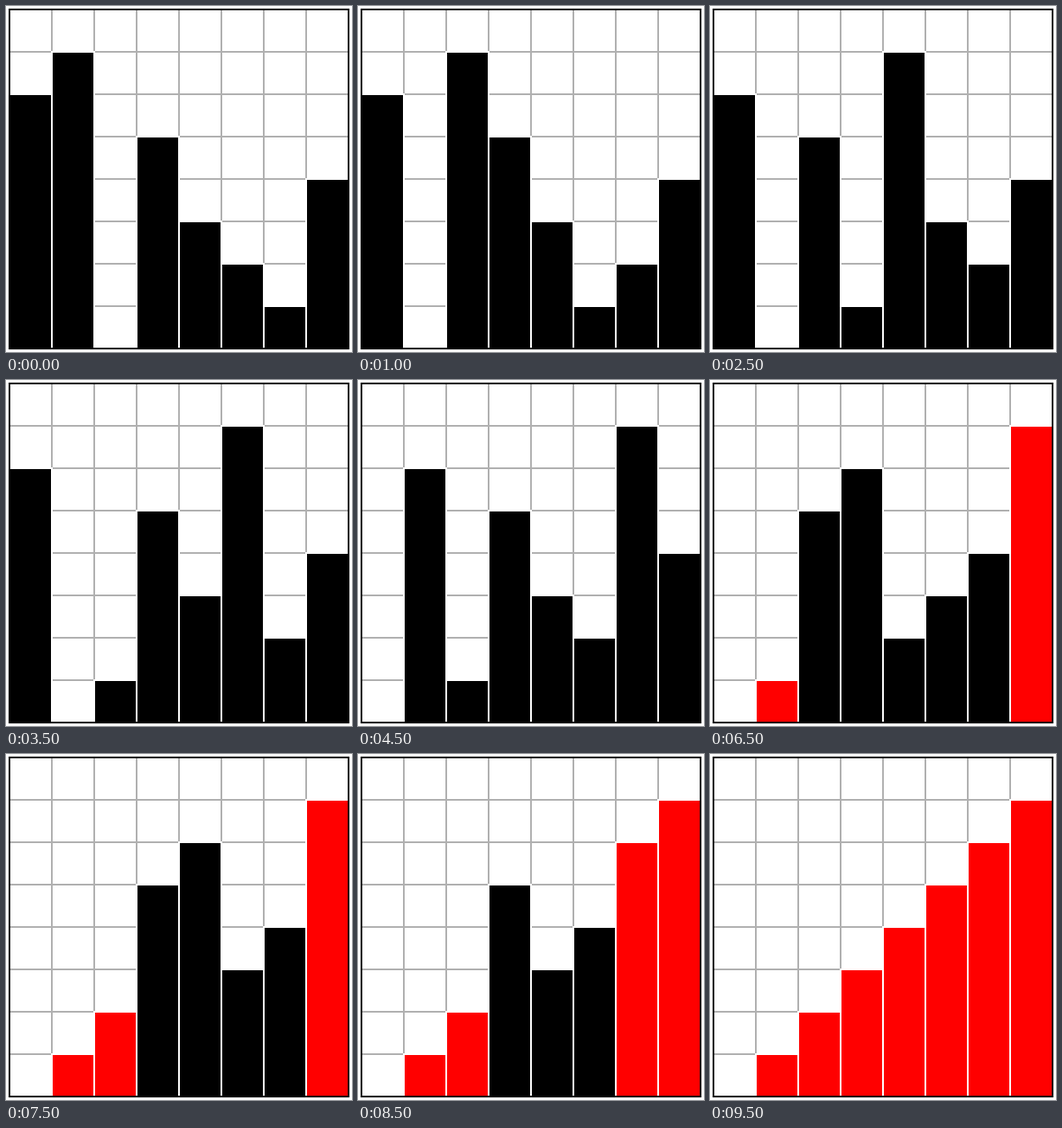
Write an HTML page that moves like this. It is 400 px wide and 400 px high and loops after 10 s.

```html
<!DOCTYPE html>
<html lang="en">
<head>
<meta charset="utf-8">
<title>Sorting bars</title>
<style>
  html, body { margin: 0; width: 100%; height: 100%; overflow: hidden; background: #fff; }
  svg { display: block; width: 100vw; height: 100vh; }
</style>
</head>
<body>
<svg id="stage" viewBox="0 0 400 400" stroke-width="2"></svg>
<script>
const COUNT = 8, CELL = 49, LEFT = 4, RIGHT = LEFT + COUNT * CELL;
const STEP = 500, LOOP = 10000;
const START = [6, 7, 0, 5, 3, 2, 1, 4];
// Each entry swaps the bar at that index with its right neighbour.
const SWAPS = [5, 1, 4, 2, 3, 2, 4, 5, 0, 6, 1, 4, 2, 3, 2, 4, 5, 3, 4];

const stage = document.getElementById("stage");

function add(tag, attrs) {
  const node = document.createElementNS("http://www.w3.org/2000/svg", tag);
  for (const key in attrs) node.setAttribute(key, attrs[key]);
  return stage.appendChild(node);
}

let grid = "";
for (let i = 1; i < COUNT; i++) {
  const p = LEFT + i * CELL;
  grid += `M${p} ${LEFT}V${RIGHT}M${LEFT} ${p}H${RIGHT}`;
}
add("path", { d: grid, fill: "none", stroke: "#b0b0b0" });

const bars = START.map((_, i) =>
  add("rect", { x: LEFT + i * CELL, width: CELL, stroke: "#fff" }));

add("rect", {
  x: LEFT, y: LEFT, width: RIGHT - LEFT, height: RIGHT - LEFT,
  fill: "none", stroke: "#000"
});

function valuesAfter(steps) {
  const list = START.slice();
  for (const i of SWAPS.slice(0, steps)) {
    [list[i], list[i + 1]] = [list[i + 1], list[i]];
  }
  return list;
}

function draw(time) {
  valuesAfter(Math.floor((time % LOOP) / STEP)).forEach((value, i) => {
    const height = value * CELL;
    bars[i].setAttribute("y", RIGHT - height);
    bars[i].setAttribute("height", height);
    bars[i].setAttribute("fill", value === i ? "#f00" : "#000");
  });
}

const begin = performance.now();
function tick() {
  draw(performance.now() - begin);
  requestAnimationFrame(tick);
}
tick();
</script>
</body>
</html>
```
